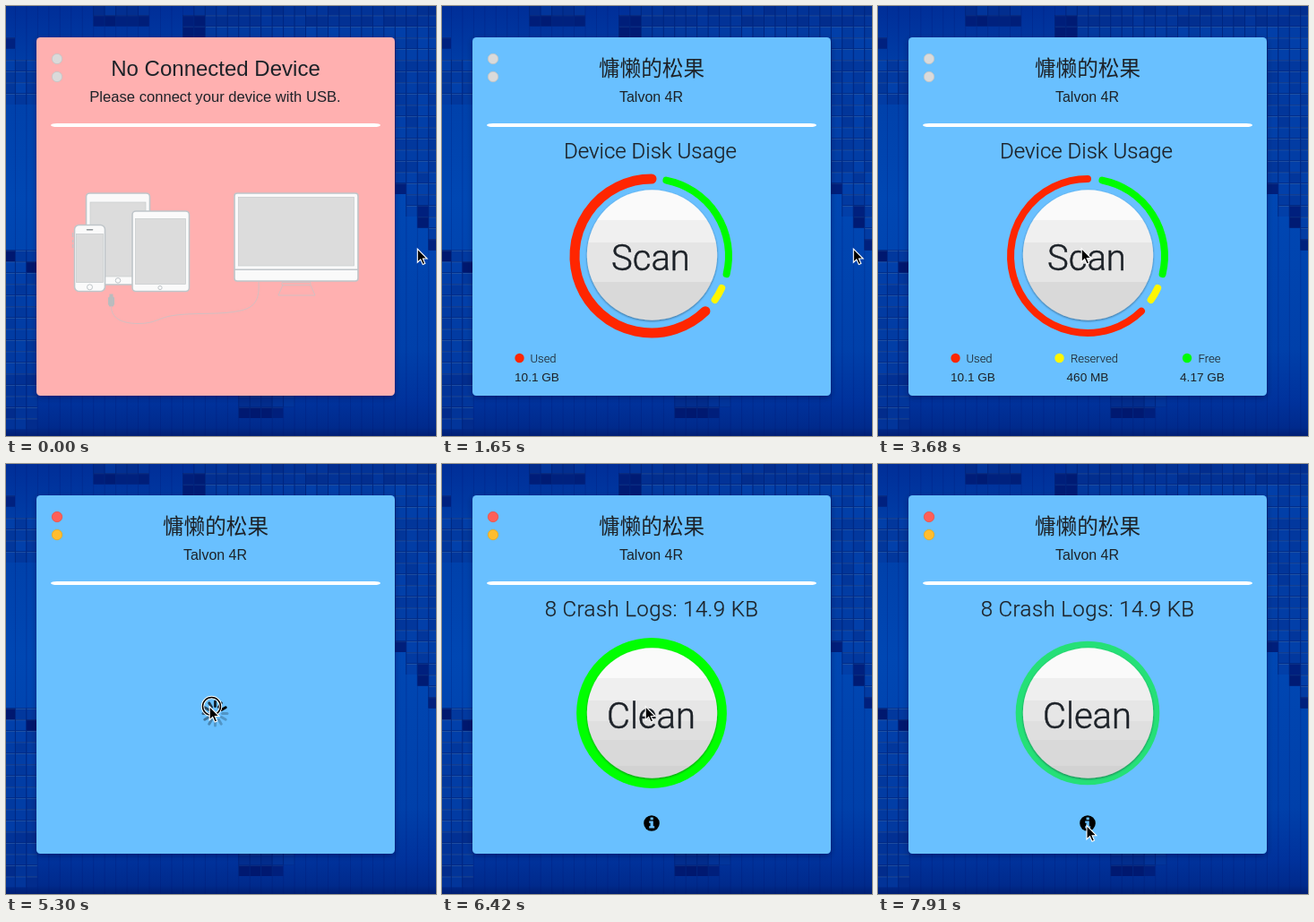
An HTML page that plays this animation: 480x480 px, repeating every 8000 ms.

```html
<!DOCTYPE html>
<html lang="en">
<head>
<meta charset="utf-8">
<title>Device cleaner</title>
<style>
html, body { margin: 0; width: 100%; height: 100%; overflow: hidden; background: #003a9e; }
svg { display: block; width: 100vw; height: 100vh; }
text { text-anchor: middle; fill: #1d2228; font-family: "Liberation Sans", Arial, sans-serif; }
.light { font-family: Roboto, "Liberation Sans", sans-serif; font-weight: 300; stroke: #1d2228; stroke-width: .25; }
.cjk { font-family: "Noto Sans CJK SC", "Noto Sans CJK JP", "Noto Sans CJK", sans-serif; font-weight: 300; }
.head { font-size: 24px; }
.sub { font-size: 16px; }
.big { font-size: 40px; stroke-width: .5; }
.name { font-size: 13px; text-anchor: start; stroke-width: .1; }
.value { font-size: 13.6px; }
.dev { fill: #fafafa; stroke: #bfc5c9; stroke-width: 1.6; }
.scr { fill: #dcdcdc; stroke: #c6cacc; stroke-width: .7; }
.wire { fill: none; stroke: #d3bfc1; stroke-width: 1; }
</style>
</head>
<body>
<svg viewBox="0 0 480 480" xmlns="http://www.w3.org/2000/svg">
  <defs>
    <linearGradient id="sky" x2="0" y2="1">
      <stop stop-color="#002e98"/><stop offset=".15" stop-color="#003fa8"/>
      <stop offset=".45" stop-color="#0047b3"/><stop offset=".8" stop-color="#0040aa"/>
      <stop offset=".92" stop-color="#00329c"/><stop offset=".98" stop-color="#002a8c"/>
      <stop offset="1" stop-color="#001f74"/>
    </linearGradient>
    <linearGradient id="scanFill" x2="0" y2="1"></linearGradient>
    <linearGradient id="cleanFill" x2="0" y2="1"></linearGradient>
    <filter id="panelShade" x="-10%" y="-10%" width="120%" height="120%">
      <feDropShadow dx="0" dy="2" stdDeviation="3" flood-color="#000a30" flood-opacity=".45"/>
    </filter>
    <filter id="knobShade" x="-10%" y="-10%" width="120%" height="120%">
      <feDropShadow dx="0" dy="1" stdDeviation="1.3" flood-color="#0a2036" flood-opacity=".55"/>
    </filter>
    <filter id="soft" x="-10%" y="-10%" width="120%" height="120%">
      <feGaussianBlur id="blur" stdDeviation="0"/>
    </filter>
  </defs>

  <rect width="480" height="480" fill="url(#sky)"/>
  <g id="tiles"></g>

  <rect id="panel" x="34" y="35" width="400" height="400" rx="4.5" filter="url(#panelShade)"/>
  <circle id="light0" cx="57" cy="59" r="5.7" stroke-width=".8"/>
  <circle id="light1" cx="57" cy="79" r="5.7" stroke-width=".8"/>
  <rect x="50" y="131" width="368" height="4" rx="7" ry="2" fill="#fff"/>

  <g id="empty">
    <text class="head" x="234" y="78">No Connected Device</text>
    <text x="233.5" y="107" font-size="16.6">Please connect your device with USB.</text>
    <g class="dev">
      <rect x="89.5" y="209" width="71" height="102" rx="4"/>
      <rect class="scr" x="94" y="219" width="62" height="83"/>
      <circle cx="125" cy="306.4" r="2.8" stroke-width="1"/>
      <rect x="76.5" y="244.5" width="34" height="74" rx="5"/>
      <rect class="scr" x="78.5" y="254.5" width="30" height="54"/>
      <circle cx="93.5" cy="313.8" r="3" stroke-width="1"/>
      <path d="M90.5 249.7h6" stroke="#8e9498" stroke-linecap="round"/>
      <path d="M74.6 253v5m0 3v3m0 2v4" stroke-width="1"/>
      <rect x="141" y="229" width="63.5" height="89.5" rx="4"/>
      <rect class="scr" x="144.5" y="237.5" width="56" height="73"/>
      <circle cx="172" cy="314.5" r="2.1" stroke-width="1"/>
      <rect x="255" y="209" width="138" height="98" rx="3"/>
      <rect class="scr" x="259.5" y="213.5" width="129" height="76.5"/>
      <path d="M255 294.3h138"/>
    </g>
    <path class="wire" d="M308 308.5h32v3h-32zM309 311.5l-5 11.5h41l-5-11.5"/>
    <path class="wire" d="M117.5 336C118 348 128 354 146 354.5 168 355 170 347 190 345 215 342 240 345 262 340 280 336 283 325 282 308"/>
    <path d="M114 326q0-1.5 1.5-1.5v-3h4v3q1.5 0 1.5 1.5v7l-1.5 2.5h-4L114 333z" fill="#b9bcbe"/>
  </g>

  <g id="owner">
    <text class="cjk" x="234" y="78" font-size="23.6">慵懒的松果</text>
    <text class="sub" x="233.5" y="107">Talvon 4R</text>
  </g>

  <g id="disk">
    <text class="head light" x="232.5" y="169.5">Device Disk Usage</text>
    <g id="arcs" fill="none" stroke-linecap="round"></g>
    <circle cx="234.5" cy="278" r="72.7" fill="url(#scanFill)" filter="url(#knobShade)"/>
    <text class="big light" x="233" y="295">Scan</text>
    <g id="legend"></g>
  </g>

  <g id="spinner" stroke="#000" stroke-width="3" stroke-linecap="round"></g>

  <g id="clean">
    <text class="head light" x="234" y="169.5" letter-spacing=".4">8 Crash Logs: 14.9 KB</text>
    <circle id="halo" cx="234" cy="278" filter="url(#soft)"/>
    <circle cx="234.5" cy="278" r="72.7" fill="url(#cleanFill)" filter="url(#knobShade)"/>
    <text class="big light" x="233.5" y="295">Clean</text>
    <circle cx="234" cy="401" r="8.8"/>
    <path d="M232.6 394.6h3.2v2.7h-3.2zM231.2 398.6h4.6v5.6h1.4v2.2h-6v-2.2h1.4v-3.4h-1.4z" fill="#69c0ff"/>
  </g>

  <g id="click" fill="none">
    <circle cx="229.5" cy="270.5" r="10" stroke="#fff" stroke-width="3.4"/>
    <circle cx="229.5" cy="270.5" r="10" stroke="#000" stroke-width="1.5"/>
  </g>
  <path id="cursor" d="M0 0V15.2L3.5 12 6 17.6 8.5 16.5 6.1 11H10.8Z" fill="#000" stroke="#fff" stroke-width="1.1"/>
</svg>

<script>
const LOOP = 8000, STEP = 86.6;
const $ = id => document.getElementById(id);
const clamp = (v, a = 0, b = 1) => Math.min(b, Math.max(a, v));
const mix = (a, b, p) => a + (b - a) * p;
const blend = (from, to, p) => `rgb(${from.map((c, i) => Math.round(mix(c, to[i], p)))})`;
const easeInOut = p => p < .5 ? 4 * p ** 3 : 1 - 4 * (1 - p) ** 3;
const easeOut = p => 1 - (1 - p) ** 2;

const PINK = [255, 176, 176], BLUE = [105, 192, 255], TEAL = [70, 197, 225], GREEN = [0, 255, 0];

function add(parent, tag, attrs, text) {
  const el = document.createElementNS("http://www.w3.org/2000/svg", tag);
  for (const k in attrs) el.setAttribute(k, attrs[k]);
  if (text) el.textContent = text;
  parent.append(el);
  return el;
}
const set = (el, attrs) => { for (const k in attrs) el.setAttribute(k, attrs[k]); };
const show = (id, opacity) => set($(id), { opacity, display: opacity > 0 ? "inline" : "none" });

// Wallpaper: blocks of tiles in grid cells, [col, row, endCol, endRow, dark]
let seed = 7;
const rnd = () => (seed = seed * 16807 % 2147483647) / 2147483647;
const gridX = c => 10 + c * 12.47, gridY = r => 10 + r * 12.5;
const blocks = [
  [7, -1, 12, 0, 0], [7, 0, 12, 1, 1], [16, -1, 38, 2, 0], [15, 0, 17, 2, 1],
  [-1, 2, 0, 3, 1], [-1, 4, 2, 8, 0],
  [34, 2, 38, 16, 0], [35, 16, 38, 18, 0], [36, 18, 38, 19, 0], [37, 19, 38, 21, 0],
  [34, 15, 35, 16, 1], [36, 17, 37, 19, 1], [37, 20, 38, 21, 1],
  [-1, 21, 2, 37, 0], [-1, 21, 0, 22, 1], [1, 22, 2, 23, 1],
  [20, 34, 25, 35, 0], [20, 35, 24, 36, 1]
];
function drawTile(g, c, r, dark) {
  const x = gridX(c), y = gridY(r), v = rnd(), edge = r < 1 || r > 31;
  const fill = dark ? `rgb(0,${22 + v * 14},${108 + v * 24})`
    : `rgb(2,${(edge ? 44 : 54) + v * 10},${(edge ? 140 : 154) + v * 16})`;
  add(g, "rect", { x, y, width: 12.47, height: 12.5, fill: "#01257c" });
  add(g, "rect", { x: x + .8, y: y + .8, width: 11.6, height: 11.7, fill });
  add(g, "rect", { x: x + .8, y: y + .5, width: 11.6, height: .8, fill: "#4b7bb4", opacity: dark ? .2 : .5 });
}
function drawTiles() {
  const g = $("tiles");
  for (let c = 0; c < 38; c++)
    add(g, "rect", { x: gridX(c), y: 0, width: .8, height: 480, fill: "#001a70", opacity: .3 });
  for (const [c0, r0, c1, r1, dark] of blocks)
    for (let r = r0; r < r1; r++)
      for (let c = c0; c < c1; c++) drawTile(g, c, r, dark);
}

// Button shading in flat bands; y measured down the page
function bands(id, list) {
  let from = 0;
  for (const [y, color] of list) {
    const to = (y - 205.3) / 145.4;
    add($(id), "stop", { offset: from, "stop-color": color });
    add($(id), "stop", { offset: to, "stop-color": color });
    from = to;
  }
}

const parts = [
  { name: "Used", value: "10.1 GB", color: "#ff2600", from: 135.8, to: 360, x: 106, dot: 86.5, label: 98.5, at: 1608 },
  { name: "Reserved", value: "460 MB", color: "#fff600", from: 114.6, to: 124.8, x: 234, dot: 202.5, label: 215, at: 1808 },
  { name: "Free", value: "4.17 GB", color: "#00fc00", from: 11, to: 103.6, x: 362, dot: 345, label: 357.5, at: 2008 }
];
const onRing = deg => {
  const a = deg * Math.PI / 180;
  return `${234 + 86 * Math.sin(a)} ${279 - 86 * Math.cos(a)}`;
};
function drawParts() {
  for (const p of parts) {
    const large = p.to - p.from > 180 ? 1 : 0;
    p.arc = add($("arcs"), "path", { d: `M${onRing(p.from)}A86 86 0 ${large} 1 ${onRing(p.to)}`, stroke: p.color });
    p.key = add($("legend"), "g", {});
    add(p.key, "circle", { cx: p.dot, cy: 393, r: 5.2, fill: p.color });
    add(p.key, "text", { class: "name light", x: p.label, y: 398 }, p.name);
    add(p.key, "text", { class: "value", x: p.x, y: 419 }, p.value);
  }
}

const spokes = [];
function drawSpinner() {
  for (let i = 0; i < 12; i++)
    spokes.push(add($("spinner"), "path", { d: "M0-8V-13.5", transform: `translate(233.5 278.5) rotate(${i * 30})` }));
}

// Spans in which the picture moves; it rests between them
const spans = [[500, 760], [1650, 2260], [2890, 3150], [3420, 3680], [5300, 6070], [6160, 6940], [7030, 7820], [7910, 8000]];
function hold(t) {
  let held = 0;
  for (const [start, end] of spans)
    if (t >= start) held = Math.min(end, start + Math.floor((t - start + 6) / STEP) * STEP);
  return held;
}

const moves = [
  [2850, 3150, 289, 317, easeInOut],
  [3340, 3680, 227.2, 270.5, easeInOut],
  [6943, 7203, 237, 362.7, easeOut],
  [7203, 7464, 233, 403.7, easeOut]
];
function cursorAt(t) {
  let x = 459.3, y = 271;
  for (const [a, b, tx, ty, ease] of moves) {
    const p = ease(clamp((t - a) / (b - a)));
    x = mix(x, tx, p);
    y = mix(y, ty, p);
  }
  return [x, y];
}

function draw(time) {
  const t = hold(time);
  const fade = clamp((t - 413) / 346) * (t >= 500);
  const scanning = t >= 5300 && t < 5470, cleaning = t >= 5470, active = t >= 5300;

  set($("panel"), { fill: blend(PINK, BLUE, fade) });
  set($("light0"), { fill: active ? "#ff5f57" : "#dadada", stroke: active ? "#e9524a" : "#c3c3c3" });
  set($("light1"), { fill: active ? "#ffbd2e" : "#dadada", stroke: active ? "#e5a71f" : "#c3c3c3" });

  show("empty", 1 - fade);
  show("owner", fade);
  show("disk", active ? 0 : fade);
  show("spinner", scanning ? 1 : 0);
  show("clean", cleaning ? 1 : 0);
  show("click", scanning ? 1 - (t - 5300) / 200 : 0);

  for (const p of parts) {
    const bump = Math.sin(Math.PI * clamp((t - p.at) / 250));
    set(p.arc, { "stroke-width": 8 + 6 * bump });
    set(p.key, { display: t >= p.at ? "inline" : "none" });
  }

  const lead = 2 + Math.floor((t - 5300 + 1) / STEP);
  spokes.forEach((s, i) => {
    const age = ((lead - i) % 12 + 12) % 12;
    set(s, { opacity: Math.max(.22, 1 - age * .1) });
  });

  const pulse = .5 - .5 * Math.cos(Math.PI * (t - 5470) / 950);
  set($("halo"), { r: 74.8 + 9.1 * pulse, fill: blend(TEAL, GREEN, pulse ** 1.5) });
  set($("blur"), { stdDeviation: .1 + 1.1 * clamp(1 - pulse * 2) });

  set($("cursor"), { transform: `translate(${cursorAt(t)})` });
}

bands("scanFill", [[239, "#fafafa"], [264, "#f0f0f0"], [308, "#e5e5e5"], [351, "#d9d9d9"]]);
bands("cleanFill", [[239, "#fafafa"], [264, "#efefef"], [287, "#e6e6e6"], [308, "#dfdfdf"], [337, "#d9d9d9"], [351, "#d2d2d2"]]);
drawTiles();
drawParts();
drawSpinner();

const begin = performance.now();
function frame() {
  draw((performance.now() - begin) % LOOP);
  requestAnimationFrame(frame);
}
frame();
</script>
</body>
</html>
```
